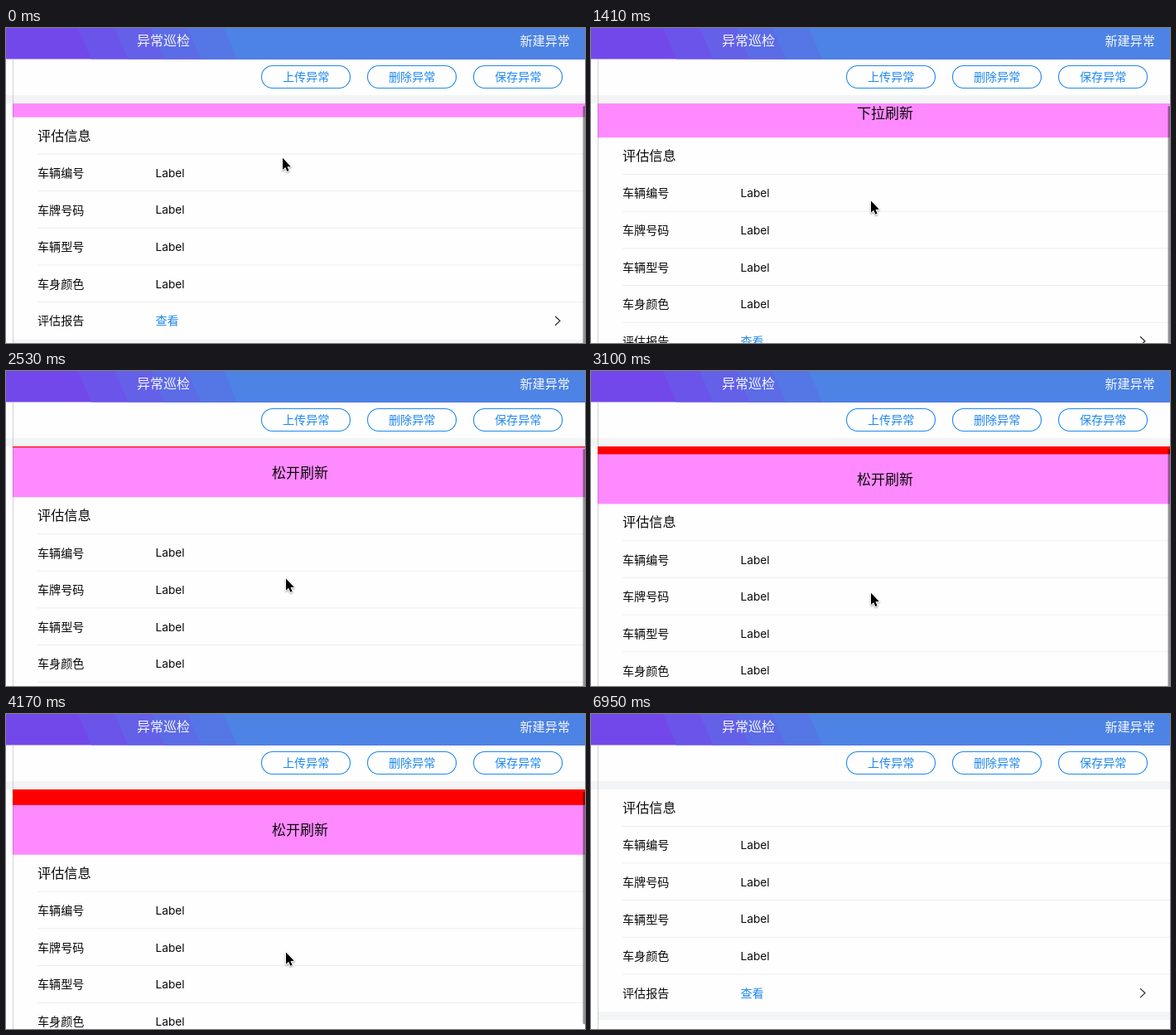
An HTML page with a canvas for the animation above (7.73 s loop, 699 by 380 pixels).

```html
<!DOCTYPE html>
<html lang="zh-CN">
<head>
<meta charset="utf-8">
<style>
html, body { margin: 0; width: 100%; height: 100%; overflow: hidden; background: #fefefe; }
canvas { display: block; }
</style>
</head>
<body>
<canvas id="stage" width="699" height="380"></canvas>
<script>
const W = 699, H = 380, LOOP = 7730;
const TOP = 91, LEFT = 8, HINT = 60, ROW = 44.65;
const RELEASE = 4590, EXIT = 5225, CLOSE = 6780;
const CJK = '"Noto Sans CJK SC", "Noto Sans CJK", sans-serif';
const INK = '#0b0b0b', BLUE = '#2089ee', PAPER = '#fefefe', BAND = '#f3f4f6', RULE = '#eeeef0';
const c = document.getElementById('stage').getContext('2d');

// [ms, pull distance] while the list is dragged down
const dragKeys = [[0, 16.6], [1410, 41.2], [2000, 53.6], [3100, 69.4], [4170, 78.8]];
const rows = ['车辆编号', '车牌号码', '车辆型号', '车身颜色', '评估报告'];

const clamp = v => Math.max(0, Math.min(1, v));

function drag(t) {
  const i = dragKeys.findIndex(k => k[0] > t);
  if (i < 0) return dragKeys[dragKeys.length - 1][1];
  const [t0, a] = dragKeys[i - 1], [t1, b] = dragKeys[i];
  return a + (b - a) * (t - t0) / (t1 - t0);
}

// drag, spring back to the hint's height, then close
function pull(t) {
  if (t < RELEASE) return drag(t);
  if (t < CLOSE) return HINT + (drag(t) - HINT) * clamp((4990 - t) / 440) ** 2;
  return HINT * clamp((6950 - t) / 210) ** 1.5;
}

function rect(color, x, y, w, h) {
  c.fillStyle = color;
  c.fillRect(x, y, w, h);
}

// y is the middle of the glyphs
function text(s, x, y, size, color = INK, family = CJK) {
  c.font = size + 'px ' + family;
  c.fillStyle = color;
  c.fillText(s, x, y + size * 0.375);
}

function path(points, close) {
  c.beginPath();
  points.forEach(([x, y]) => c.lineTo(x, y));
  if (close) c.closePath();
}

function header() {
  const h = 37.5;
  for (let i = 0; i < 6; i++) {
    const k = i / 5, x = i ? 43 + i * 44 : -16;
    path([[x, 0], [W, 0], [W, h], [x + 16, h]], true);
    c.fillStyle = `rgb(${115 - 38 * k}, ${72 + 59 * k}, ${234 - 6 * k})`;
    c.fill();
  }
  text('异常巡检', 158, 15, 16, '#f4f5ff');
  text('新建异常', 620.5, 15.5, 15.1, '#f4f8ff');
}

function toolbar() {
  rect(BAND, 0, 81, W, 10);
  c.strokeStyle = BLUE;
  c.lineWidth = 1.1;
  ['上传异常', '删除异常', '保存异常'].forEach((s, i) => {
    const x = 308 + i * 128;
    c.beginPath();
    c.roundRect(x + 0.5, 45.5, 107, 27, 13.5);
    c.stroke();
    text(s, x + 26, 59, 14.1, BLUE);
  });
}

function list(p, t) {
  const edge = TOP + p;
  c.save();
  c.beginPath();
  c.rect(0, TOP, W, H - TOP);
  c.clip();

  rect('#ff0000', LEFT, TOP, W, p);
  rect('#ff8aff', LEFT, edge - HINT, W, HINT + 1);
  const hint = t >= RELEASE ? '正在加载' : p >= HINT ? '松开刷新' : '下拉刷新';
  text(hint, 321, edge - HINT / 2, 17);

  rect(PAPER, 0, edge, W, H);
  text('评估信息', 38, edge + 22, 16.2);
  rows.forEach((s, i) => {
    const y = edge + 67 + i * ROW;
    rect(RULE, 38, y - 23.1, W, 1);
    text(s, 38, y, 14.1);
    if (i < 4) {
      text('Label', 180.5, y, 13.7, INK, 'Inter, sans-serif');
    } else {
      text('查看', 180.5, y, 14.1, BLUE);
      path([[663, y - 5.5], [668.8, y], [663, y + 5.5]]);
      c.strokeStyle = '#333';
      c.lineWidth = 1.3;
      c.stroke();
    }
  });
  rect(BAND, LEFT, edge + 268, W, 10);
  c.restore();

  rect('rgba(0,0,0,.17)', LEFT, 38, 1, H);
}

function scrollbar(p, t) {
  c.fillStyle = `rgba(0,0,0,${0.42 * clamp((4980 - t) / 300)})`;
  c.beginPath();
  c.roundRect(696.5, 94, 3, 359 - p, 1.5);
  c.fill();
}

function cursor(t) {
  const k = clamp((t - EXIT) / (5520 - EXIT)) ** 1.25;
  if (k === 1) return;
  c.save();
  c.translate(333 + 4 * clamp(t / 1410) + k * 235, 121 + 2.1 * drag(t) + k * 100);
  path([[1, 1], [1, 15.2], [4.2, 12.2], [6.4, 17.2], [8.6, 16.2], [6.4, 11.4], [10.8, 11.3]], true);
  c.shadowColor = 'rgba(0,0,0,.4)';
  c.shadowBlur = 2;
  c.shadowOffsetY = 1;
  c.strokeStyle = '#fff';
  c.lineWidth = 2;
  c.lineJoin = 'round';
  c.stroke();
  c.shadowColor = 'transparent';
  c.fillStyle = '#000';
  c.fill();
  c.restore();
}

function draw(now) {
  const t = now % LOOP, p = pull(t);
  rect(PAPER, 0, 0, W, H);
  header();
  toolbar();
  list(p, t);
  scrollbar(p, t);
  cursor(t);
}

let start;
function tick(now) {
  start ??= now;
  draw(now - start);
  requestAnimationFrame(tick);
}
draw(0);
requestAnimationFrame(tick);
</script>
</body>
</html>
```
